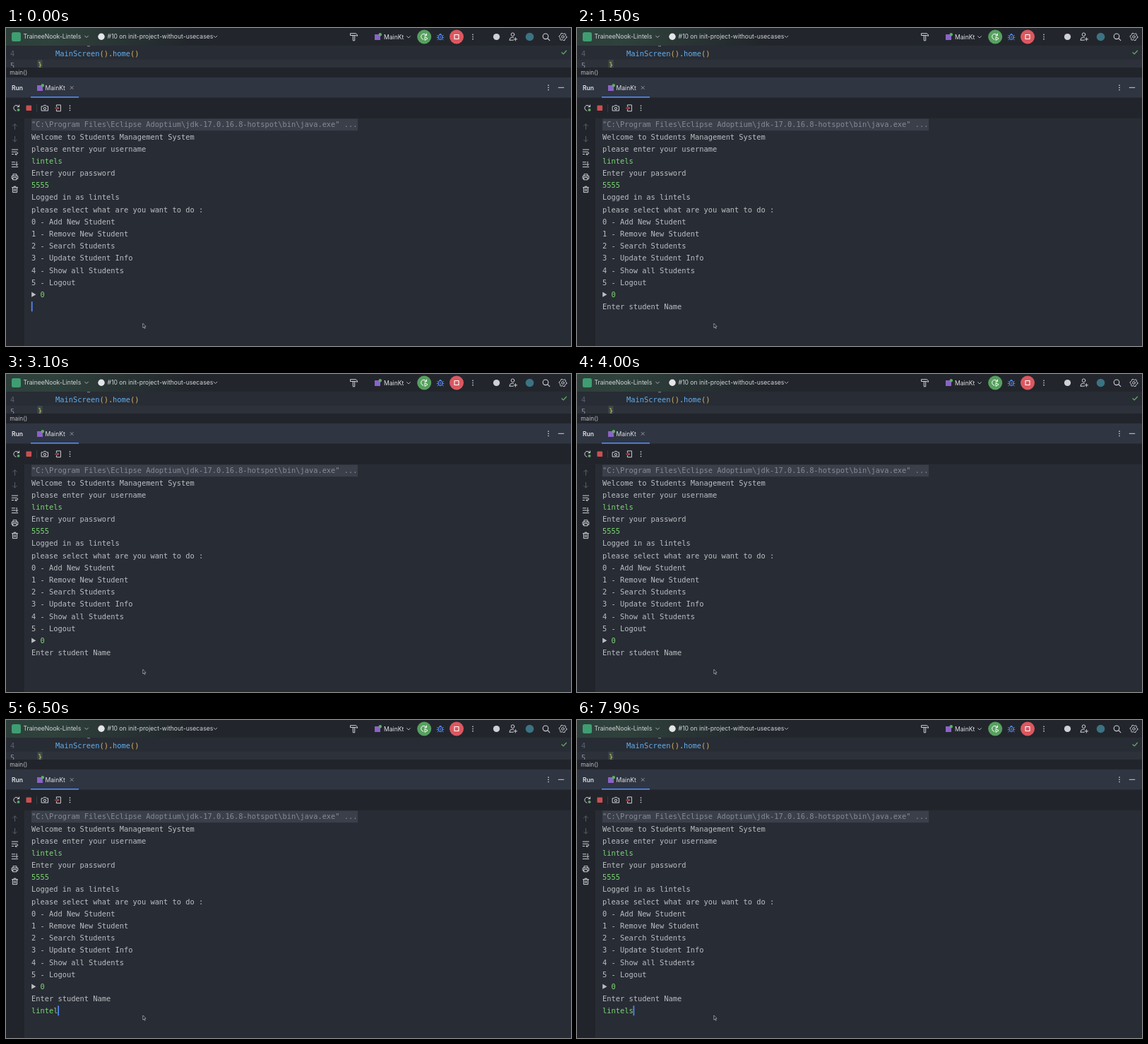
Write an HTML page with a canvas that moves like this. It is 800 by 450 pixels and loops after 8 s.

```html
<!DOCTYPE html>
<html lang="en">
<head>
<meta charset="utf-8">
<title>Console session</title>
<style>
  html, body { margin: 0; width: 100%; height: 100%; overflow: hidden; background: #282c34; }
  canvas { display: block; width: 800px; height: 450px; }
</style>
</head>
<body>
<canvas id="stage" width="800" height="450"></canvas>
<script>
const g = document.getElementById('stage').getContext('2d');
const LOOP = 8000;
const MONO = '10.36px "DejaVu Sans Mono", "Noto Sans Mono", monospace';
const UI = '8.6px Inter, "Open Sans", sans-serif';
const CELL = 6.24, LEFT = 36, BASE = 140.4, PITCH = 17.18;
const INK = '#ced0d6', TEXT = '#bcbec4', GREEN = '#7bd576', BLUE = '#568af2';

const USER = 'lintels';
const LOG = [
  'Welcome to Students Management System', 'please enter your username', '>' + USER,
  'Enter your password', '>5555', 'Logged in as ' + USER,
  'please select what are you want to do :', '0 - Add New Student', '1 - Remove New Student',
  '2 - Search Students', '3 - Update Student Info', '4 - Show all Students', '5 - Logout'
];
const PROMPT_AT = 300;
const KEYS = [4500, 4800, 5100, 5600, 6000, 6400, 6900];

function box(x, y, w, h, color, r = 0) {
  g.fillStyle = color;
  g.beginPath();
  g.roundRect(x, y, w, h, r);
  g.fill();
}

function disc(x, y, r, color) {
  g.fillStyle = color;
  g.beginPath();
  g.arc(x, y, r, 0, 7);
  g.fill();
}

function text(s, x, y, color, font = UI) {
  g.font = font;
  g.fillStyle = color;
  g.fillText(s, x, y);
}

// Strokes an SVG path around the point (x, y).
function icon(x, y, d, color = INK, width = 1) {
  g.save();
  g.translate(x, y);
  g.strokeStyle = color;
  g.lineWidth = width;
  g.lineCap = g.lineJoin = 'round';
  g.stroke(new Path2D(d));
  g.restore();
}

function ring(r) {
  return `M${r} 0A${r} ${r} 0 1 1 ${-r} 0A${r} ${r} 0 1 1 ${r} 0`;
}

function chevron(x, y) { icon(x, y, 'M-2.4 -1.2L0 1.2L2.4 -1.2', '#a9adb6'); }

function kebab(x, y) {
  for (const dy of [-3.2, 0, 3.2]) disc(x, y + dy, 0.85, INK);
}

function rerun(x, y, color, dot) {
  icon(x, y, 'M3.3 -2A4 4 0 1 0 -1 3.9M3.6 -4.3V-1.7H1', color);
  if (dot) disc(x + 2.6, y + 2.6, 1.9, dot);
}

function runTag(x, y) {
  box(x - 4, y - 4, 8, 8, '#8a63c7');
  disc(x + 3.8, y - 3.7, 2.2, '#5fad65');
}

function topBar() {
  box(0, 0, 800, 25, '#22262c');
  const tint = g.createLinearGradient(0, 0, 260, 0);
  tint.addColorStop(0, 'rgba(62,98,78,.42)');
  tint.addColorStop(0.25, 'rgba(62,98,78,.46)');
  tint.addColorStop(1, 'rgba(62,98,78,0)');
  box(0, 0, 260, 25, tint);

  box(8, 6, 13, 13, '#3f9d72', 2.5);
  text('TraineeNook-Lintels', 24.5, 15.3, '#d3d5da');
  chevron(114, 12.3);
  disc(135, 12.3, 4.7, '#e3e5e8');
  text('#10 on init-project-without-usecases', 143.5, 15.3, '#d3d5da');
  chevron(296.5, 12.3);

  icon(492.5, 12.5, 'M-4.6 -4.8H3L5 -2.6V-1.2L2.4 -2H-4.6ZM-1.2 -2V5.3H1.2V-2');
  runTag(526, 13);
  text('MainKt', 535, 15.6, '#dfe1e5');
  chevron(570, 12.8);

  disc(592.2, 12.5, 10, '#57a05f');
  rerun(591.8, 12.3, '#fff');
  icon(594.8, 14.8, 'M-1.4 -2.4L2.2 0L-1.4 2.4Z', '#fff');
  icon(615, 12.5, 'M-2.6 -.6A2.6 2.6 0 0 1 2.6 -.6V1.6A2.6 2.6 0 0 1 -2.6 1.6Z' +
    'M-1.6 -3A1.7 1.7 0 0 1 1.6 -3M-2.6 -.6L-4.4 -2M2.6 -.6L4.4 -2M-2.6 1H-4.8M2.6 1H4.8' +
    'M-2.3 2.6L-4.2 4.2M2.3 2.6L4.2 4.2M0 -1V2.5', BLUE);
  disc(638, 12.5, 10, '#db5860');
  icon(638, 12.5, 'M-3 -3H3V3H-3Z', '#fff', 1.1);
  kebab(661, 12.5);

  disc(694.5, 12.5, 4.6, INK);
  icon(717.5, 12, 'M2.3 -2.8A2.3 2.3 0 1 1 -2.3 -2.8A2.3 2.3 0 1 1 2.3 -2.8' +
    'M-4.3 5.2V4A3.2 3.2 0 0 1 -1 1.3H1M-4.3 5.2H.8M3.8 1.6V6M1.6 3.8H6');
  disc(741.5, 12.5, 5.8, '#3c7383');
  icon(764, 11.8, ring(3.8) + 'M2.8 2.8L5.8 5.8', INK, 1.1);
  gear(788.5, 12.5);
}

function gear(x, y) {
  let d = ring(1.8);
  for (let i = 0; i <= 24; i++) {
    const a = i * Math.PI / 12, r = i % 4 < 2 ? 5.4 : 4.3;
    d += (i ? 'L' : 'M') + (r * Math.cos(a)).toFixed(2) + ' ' + (r * Math.sin(a)).toFixed(2);
  }
  icon(x, y, d);
}

function editor() {
  box(0, 25, 800, 31, '#282c34');
  box(0, 44.5, 800, 11.5, '#2c313a');
  g.save();
  g.beginPath();
  g.rect(0, 25, 800, 31);
  g.clip();
  box(115, 25, 4, 1.2, '#777b84');
  text('4', 6, 39.7, '#5a6170', MONO);
  text('5', 6, 57, '#858b98', MONO);
  let x = 70;
  for (const [part, color] of [['MainScreen', '#61afef'], ['()', '#d9b45f'],
    ['.', TEXT], ['home', '#61afef'], ['()', '#d9b45f']]) {
    text(part, x, 39.7, color, MONO);
    x += part.length * CELL;
  }
  box(44.5, 45, 7, 11, '#3c4a48');
  text('}', 45, 56, '#d9c25f', MONO);
  g.restore();
  icon(790, 34.5, 'M-3 .2L-.8 2.4L3.4 -2.3', '#5fad65', 1.3);
}

function panels() {
  box(0, 56, 800, 14, '#21252b');
  text('main()', 5.3, 66.3, TEXT, '8.3px Inter, "Open Sans", sans-serif');

  box(0, 70, 800, 28.5, '#2f3541');
  text('Run', 8, 87.5, '#dfe1e5', '600 8.6px Inter, "Open Sans", sans-serif');
  runTag(48, 85);
  text('MainKt', 55.5, 87.5, '#dfe1e5');
  icon(93.2, 84.5, 'M-2 -2L2 2M2 -2L-2 2', '#9da0a8', 0.9);
  box(35, 97, 68, 1.8, BLUE);
  kebab(768, 84.3);
  icon(786, 84.3, 'M-3.8 0H3.8');

  box(0, 98.8, 800, 29, '#21252b');
  rerun(15, 113.3, INK, '#5fad65');
  box(28.5, 109.5, 7.6, 7.6, '#c94f53', 1);
  box(43.2, 108, 0.8, 11, '#3b404a');
  icon(55, 113.4, 'M-4.5 -2.6H-2.4L-1.4 -4H1.4L2.4 -2.6H4.5V3.6H-4.5Z' +
    'M1.7 .4A1.7 1.7 0 1 1 -1.7 .4A1.7 1.7 0 1 1 1.7 .4');
  icon(74, 113.3, 'M-2.6 -2V-4.4H3.4V4.4H-2.6V2');
  icon(73.2, 113.3, 'M-3.6 0H1.4M-.4 -1.8L1.4 0L-.4 1.8', '#db5c5c');
  kebab(90.5, 113.3);

  box(0, 127.8, 800, 323, '#282c34');
  box(0, 127.8, 26, 323, '#21252b');
  const dim = '#565b66';
  icon(12.5, 139.5, 'M0 3.8V-3.6M-2.8 -.9L0 -3.7L2.8 -.9', dim);
  icon(12.5, 157.3, 'M0 -3.8V3.6M-2.8 .9L0 3.7L2.8 .9', dim);
  icon(12.5, 175.3, 'M-4.2 -3.2H4.2M-4.2 0H2.8A1.7 1.7 0 0 1 2.8 3.3H.6M2 1.9L.6 3.3L2 4.7M-4.2 3.2H-1.8');
  icon(12.5, 193, 'M-4.2 -3.2H.2M-4.2 0H.2M-4.2 3.6H4.2M2.6 -3.8V1.4M.9 -.2L2.6 1.5L4.3 -.2');
  icon(12.5, 210.8, 'M-2.5 -1.4V-4H2.5V-1.4M-2.5 2.4H-4.3V-1.4H4.3V2.4H2.5M-2.5 .8H2.5V4H-2.5Z');
  icon(12.5, 228.4, 'M-4 -2.7H4M-1.4 -2.8V-4.2H1.4V-2.8M-3.1 -2.6V4.2H3.1V-2.6M-1 -.6V2.2M1 -.6V2.2');
}

function line(row, s, color = TEXT, x = LEFT) { text(s, x, BASE + row * PITCH, color, MONO); }

function caret(row, col) {
  box(LEFT + col * CELL - 0.2, BASE + row * PITCH - 11, 1.8, 14, '#5286ee');
}

function consoleLog(t) {
  box(LEFT, 128.6, 462, 16.6, '#3a3f4a');
  line(0, '"C:\\Program Files\\Eclipse Adoptium\\jdk-17.0.16.8-hotspot\\bin\\java.exe" ...', '#858a94');
  LOG.forEach((s, i) => s[0] === '>' ? line(i + 1, s.slice(1), GREEN) : line(i + 1, s));

  g.fillStyle = TEXT;
  g.fill(new Path2D('M36.2 373.6L42.4 377.2L36.2 380.8Z'));
  line(14, '0', GREEN, LEFT + 2 * CELL);

  if (t < PROMPT_AT) {
    caret(15, 0);
    return;
  }
  line(15, 'Enter student Name');
  const typed = KEYS.filter(k => k <= t).length;
  if (typed) {
    line(16, USER.slice(0, typed), GREEN);
    caret(16, typed);
  }
}

function pointer() {
  const p = new Path2D('M193.8 418L193.8 424.2L195.2 423L196.2 425.2L197.2 424.8L196.3 422.6L198 422.4Z');
  g.fillStyle = '#15171b';
  g.fill(p);
  g.strokeStyle = '#d5d7db';
  g.lineWidth = 0.6;
  g.stroke(p);
}

function draw(now) {
  topBar();
  editor();
  panels();
  consoleLog(now % LOOP);
  pointer();
  requestAnimationFrame(() => draw(performance.now() - start));
}

const start = performance.now();
draw(0);
</script>
</body>
</html>
```
